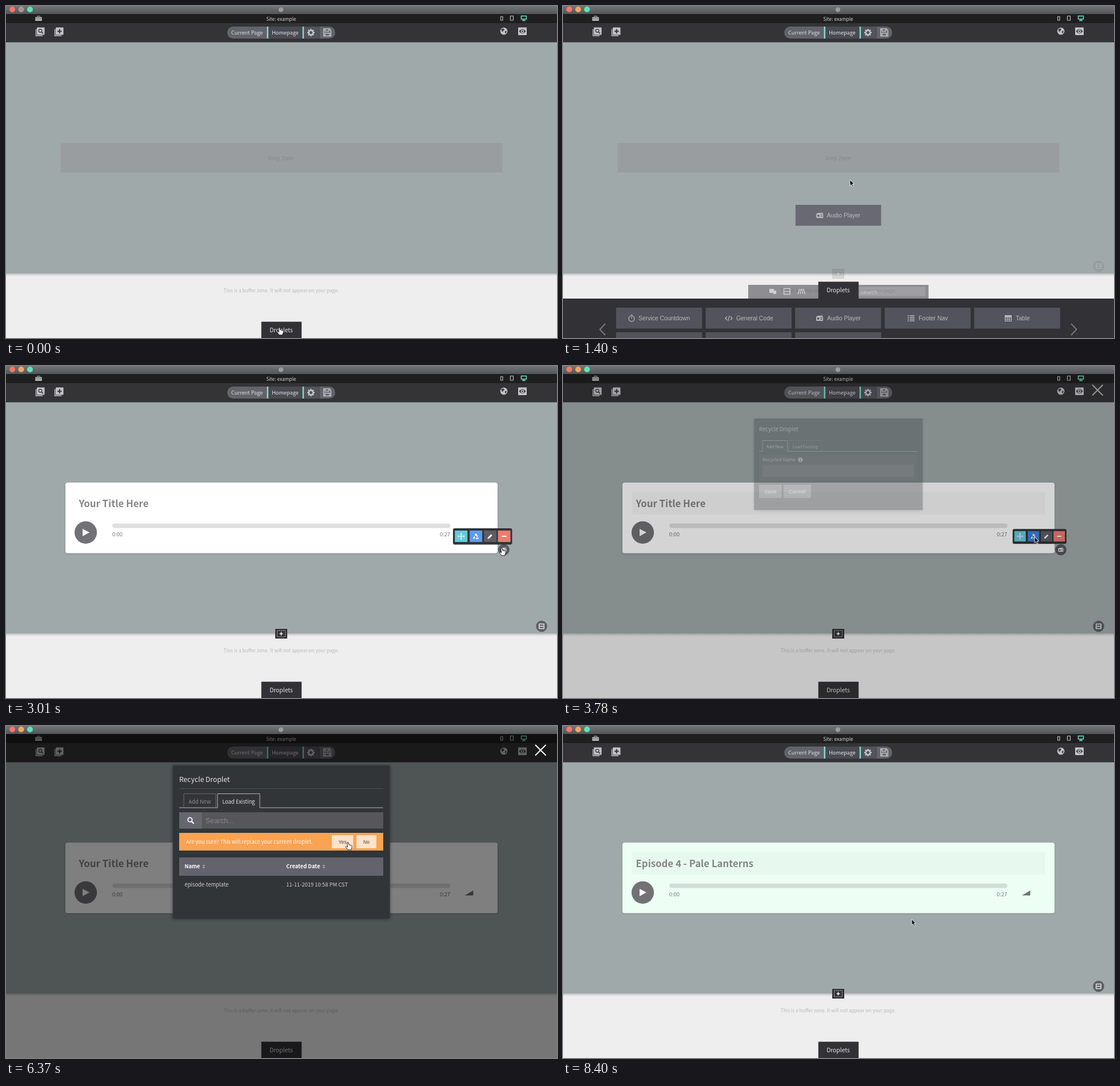
An HTML page for the animation above (8470 ms loop, 964 by 581 pixels).

```html
<!DOCTYPE html>
<html lang="en">
<head>
<meta charset="utf-8">
<title>Page builder</title>
<style>
html, body { margin: 0; width: 100%; height: 100%; overflow: hidden; background: #eee; }
svg { display: block; width: 964px; height: 581px; }
text { font-family: "Noto Sans CJK JP", "Noto Sans CJK SC", "Noto Sans CJK", "Noto Sans", sans-serif; white-space: pre; }
text.ui { font-family: "Liberation Sans", Arial, sans-serif; }
</style>
</head>
<body>
<svg id="stage" viewBox="0 0 964 581" xmlns="http://www.w3.org/2000/svg"></svg>
<script>
const LOOP = 8470;
const ICON = '#c2c3c6';

// Markup helpers
const rect = (x, y, w, h, fill, more = '') =>
  `<rect x="${x}" y="${y}" width="${w}" height="${h}" fill="${fill}" ${more}/>`;
const circle = (x, y, r, fill, more = '') => `<circle cx="${x}" cy="${y}" r="${r}" fill="${fill}" ${more}/>`;
const fillPath = (d, fill, more = '') => `<path d="${d}" fill="${fill}" ${more}/>`;
const line = (d, stroke, width = 1, more = '') =>
  `<path d="${d}" fill="none" stroke="${stroke}" stroke-width="${width}" ${more}/>`;
const text = (x, y, s, size, fill, more = '') =>
  `<text x="${x}" y="${y}" font-size="${size}" fill="${fill}" ${more}>${s}</text>`;
const group = (id, body, more = '') => `<g id="${id}" ${more}>${body}</g>`;
const place = (x, y, body) => `<g transform="translate(${x} ${y})">${body}</g>`;
const MID = 'text-anchor="middle"';
const UI = 'class="ui"';
const BOLD = 'font-weight="700"';

// Icons, centred on their origin
const radio = (c, hole) => rect(-6, -3.5, 12, 8, c, 'rx="1"') + circle(-2.5, .5, 2, hole) +
  rect(1, -1.5, 4, 1.2, hole) + rect(1, 1.2, 4, 1.2, hole) + line('M-4 -3.5 L5 -5', c, 1);
const clock = c => circle(0, .6, 5, 'none', `stroke="${c}" stroke-width="1.2"`) +
  line('M0 .6 V-2.4 M-1.5 -6 H1.5', c, 1.2);
const code = c => line('M-3 -3 L-6 0 L-3 3 M3 -3 L6 0 L3 3 M1.3 -4.5 L-1.3 4.5', c, 1.2);
const list = c => line('M-6 -4.5 H-4 M-6 -1.5 H-4 M-6 1.5 H-4 M-6 4.5 H-4 M-2.5 -4.5 H6 M-2.5 -1.5 H6 M-2.5 1.5 H6 M-2.5 4.5 H6', c, 1.5);
const table = c => line('M-5.5 -5 H5.5 V5 H-5.5 Z M-5.5 -1.5 H5.5 M-5.5 1.8 H5.5 M-1.8 -4 V5 M1.8 -4 V5', c, 1.1) +
  rect(-6, -5.5, 12, 3, c);
const lens = (c, k = 1) => `<g transform="scale(${k})">` +
  circle(-1, -1, 3.4, 'none', `stroke="${c}" stroke-width="1.6"`) + line('M1.5 1.5 L5 5', c, 2) + '</g>';
const gear = c => Array.from({ length: 8 }, (_, i) =>
  rect(-1.3, -6.5, 2.6, 4, c, `transform="rotate(${i * 45})"`)).join('') +
  circle(0, 0, 3.8, 'none', `stroke="${c}" stroke-width="2"`);
const sorter = c => fillPath('M-2.6 -.7 L0 -3.5 L2.6 -.7 Z M-2.6 .7 L0 3.5 L2.6 .7 Z', c);

function windowBar() {
  return rect(0, 0, 964, 14, 'url(#bar)') + circle(11, 6, 5, '#fb7565') +
    circle(26.5, 6, 5, '#f5a55f', 'id="amber"') + circle(42, 6, 5, '#62e2b8') + circle(481, 6.5, 4, '#9b9da0');
}

function header() {
  const page = line('M-7.5 -4 V7.5 H4', ICON, 1.4) + rect(-6, -7, 13.5, 13, ICON, 'rx="1"');
  const site = rect(0, 14, 964, 16, '#1f1f20') + rect(0, 30, 964, 33.5, '#343437') +
    rect(51, 19.5, 12, 6.5, '#b5b6b8', 'rx="1"') + line('M54.5 19 V17.8 H59.5 V19', '#b5b6b8') +
    rect(51, 22, 12, .8, '#555') + text(481.5, 26, 'Site: example', 8.4, '#d4d4d5', MID) +
    line('M865.5 18.5 H869 V25 H865.5 Z', '#bbb', 1.2) + line('M882.5 17.5 H887.5 V25 H882.5 Z', '#bbb', 1.2) +
    line('M901.5 17.5 H910.5 V23 H901.5 Z M903 25.5 H909 M906 23 V25', '#6be0c5', 1.5);
  const tools = place(60, 44.5, page + place(.8, -.4, lens('#343437', .8))) +
    place(93, 44.5, page + line('M.8 -4 V3.5 M-3 -.3 H4.5', '#343437', 2)) +
    rect(387, 36, 189, 21, '#63636b', 'rx="10.5"') + rect(459, 36, 60, 21, '#4a4a52') +
    rect(521, 36, 26.5, 21, '#53535b') + rect(547.5, 36, 1, 21, '#414147') +
    rect(456.5, 36, 2.5, 21, '#7ddccb') + rect(518.7, 36, 2.5, 21, '#7ddccb') +
    text(421.7, 50, 'Current Page', 9.2, '#dcdcde', MID) + text(488.5, 50, 'Homepage', 9.2, '#e2e2e4', MID) +
    place(533.5, 46.5, gear(ICON)) +
    line('M555.7 40 H566 L568.3 42.5 V52.5 H555.7 Z M558 40 V44 H565 V40 M558 52 V47.5 H566 V52', ICON, 1.5);
  const right = circle(871, 44, 6.3, ICON) +
    fillPath('M866 41 L870 39 L872 41 L870 44 L868 45 L869 48 Z M873 44 L876 43 L875 47 L873 48 Z', '#45464a') +
    rect(896, 37.5, 15, 13.5, ICON, 'rx="1"') + fillPath('M897.5 44.2 Q903.5 37 909.5 44.2 Q903.5 51.5 897.5 44.2 Z', '#343437') +
    circle(903.5, 44.2, 2.8, ICON) + circle(903.5, 44.2, 1.2, '#343437');
  return site + tools + right;
}

function player() {
  return rect(104, 204, 756, 123.5, '#fff', 'rx="4" id="card" filter="url(#soft)"') +
    rect(121, 220.5, 722, 39.5, '#000', 'id="titleBox"') +
    text(127.5, 246.5, '', 16.8, '#858687', `${BOLD} id="title"`) +
    circle(139.5, 291.3, 19.6, '#727276') + fillPath('M134 285 L146 291.3 L134 297.8 Z', '#fff') +
    rect(186, 275.8, 591.5, 7.6, '#000', 'rx="3.8" opacity=".125"') +
    text(185.7, 297.6, '0:00', 9.4, '#77787a', 'font-weight="500"') +
    text(777.2, 297.6, '0:27', 9.4, '#77787a', 'font-weight="500" text-anchor="end"') +
    fillPath('M803 296.6 L817.5 287.8 V296.6 Z', '#707174');
}

function menu() {
  const slot = (x, fill, icon, id = '') => place(x, 298, rect(-11, -10, 22, 20, fill, id) + icon);
  return rect(782, 284, 103.5, 28.5, '#333337', 'rx="3"') +
    slot(796.3, '#62cbdc', line('M-5 0 H5 M0 -5 V5 M-5 -1.5 V1.5 M5 -1.5 V1.5 M-1.5 -5 H1.5 M-1.5 5 H1.5', '#fff', 1.2)) +
    slot(822.2, '#5a9cf0', line('M0 -4 L4 3.5 H-4 Z', '#fff', 1.9, 'stroke-dasharray="5.5 1.8" stroke-linejoin="round"'), 'id="recycle"') +
    slot(847.2, '#5d5e63', line('M-3 3 L2.6 -2.6', '#fff', 3) + fillPath('M-4.8 4.8 L-4 1.6 L-1.6 4 Z', '#fff')) +
    slot(871.6, '#ee7a72', line('M-4 0 H4', '#fff', 2));
}

function tray() {
  const labels = [['Service Countdown', 120, 132, clock], ['General Code', 290, 303, code],
    ['Audio Player', 449, 462, c => radio(c, '#53535d')], ['Footer Nav', 609, 622, list], ['Table', 779, 792, table]];
  const column = i => 93 + i * 156.6;
  const button = (i, y) => rect(column(i), y, 150.3, 36.5, '#53535d');
  const items = labels.map(([s, ix, tx, icon], i) => button(i, 16) + place(ix, 34.5, icon('#b9b9be')) +
    text(tx, 38, s, 10.4, '#b9b9be', UI)).join('') + [0, 1, 2].map(i => button(i, 59)).join('');
  const strip = rect(324, -24, 315.5, 24, '#5b5b62') + rect(515, -20.5, 119, 16, '#77777d') +
    fillPath('M361 -17 H369 V-14 H373 V-8 H368 V-10 H361 Z', '#c0c0c4') +
    line('M386.5 -17.5 H397 V-7.5 H386.5 Z M386.5 -12.5 H397', '#c0c0c4', 1.5) +
    line('M411 -8 L414 -17 M415 -8 L416.5 -17 M418 -17 L419.5 -8 M420.5 -17 L423.5 -8', '#c0c0c4', 1.5) +
    text(520, -8.5, 'Search', 9.5, '#b9b9be', UI);
  return group('strip', strip) + rect(446.7, -29.5, 70.5, 31, '#323236') +
    text(481.5, -11, 'Droplets', 10.3, '#e6e6e8', MID) + rect(0, 0, 964, 125, '#323236') + items +
    line('M74 44 L64.5 54 L74 64 M889 44 L898.5 54 L889 64', '#78787d', 2);
}

function modal() {
  const rim = active => active ? '#b4b5b8' : '#66676b';
  const tab = (x, w, s, active) => line(`M${x} 143 V118.5 H${x + w} V143`, rim(active)) +
    text(x + w / 2, 135.5, s, 9.35, active ? '#e2e2e4' : (s === 'Add New' ? '#8b8c90' : '#c5c5c8'), MID);
  const rule = (from, to) => line(`M303 143 H${from} M${to} 143 H660`, '#b4b5b8');
  const tabs = first => tab(311, 56, 'Add New', first) + tab(370, 74, 'Load Existing', !first) +
    (first ? rule(311, 367) : rule(370, 444));
  const push = (x, w, s) => rect(x, 218, w, 30, '#74757d') + text(x + w / 2, 237.5, s, 12.2, '#fff', `${UI} ${MID}`);
  const addNew = tabs(true) + rect(303, 151, 357, 57, '#3e3f43') + text(311, 166, 'Recycled Name', 10.3, '#cbcccf') +
    circle(396, 162, 5, '#d6d6d8') + rect(395.2, 161.3, 1.8, 4, '#3e3f43') + rect(395.2, 158.6, 1.8, 1.7, '#3e3f43') +
    rect(311, 173, 341, 27.5, '#56575a') + push(303, 51, 'Save') + push(358, 62, 'Cancel');
  const answer = (x, w, s) => rect(x, 191, w, 23, '#fde2ca') + text(x + w / 2, 206, s, 8.6, '#444', `${UI} ${MID}`);
  const confirm = rect(303, 187, 357, 31, '#f9a353') +
    text(315, 206, 'Are you sure? This will replace your current droplet.', 9.32, '#fff5e8') +
    answer(570, 37.5, 'Yes') + answer(613, 35, 'No');
  const rows = rect(303, 230, 357, 32, '#62636d') +
    text(312.5, 249.3, 'Name', 9.35, '#fff', BOLD) + place(346, 246, sorter('#a9aab0')) +
    text(490.3, 249.3, 'Created Date', 9.35, '#fff', BOLD) + place(556, 246, sorter('#a9aab0')) +
    text(312.5, 281.3, 'episode-template', 9.35, '#cfd0d2') + text(490.3, 281.3, '11-11-2019 10:58 PM CST', 9.35, '#cfd0d2');
  const load = tabs(false) + rect(303, 151, 357, 28.5, '#56575b') + rect(303, 151, 39.5, 28.5, '#66676e') +
    place(323, 165.2, lens('#fff', 1.1)) + text(349, 170, 'Search...', 12.4, '#88898d', UI) +
    group('confirm', confirm) + group('rows', rows);
  return rect(291.7, 69, 380, 206, '#333438', 'id="panel" filter="url(#deep)"') +
    text(303, 97.7, 'Recycle Droplet', 12.2, '#e4e4e6') + line('M303 109.5 H660', '#4c4d52') +
    group('addNew', addNew) + group('load', load);
}

const plusButton = rect(471, 460, 21, 17, '#333336') +
  line('M474.5 463 H488.5 V474 H474.5 Z', '#c5c5c8', 1, 'stroke-dasharray="2 1.3"') + line('M478.5 468.5 H484.5 M481.5 465.5 V471.5', '#fff', 1.5);
const sectionButton = circle(937, 455.5, 9.8, '#5e5f64') + line('M932.7 451.5 H941.3 V459.5 H932.7 Z M932.7 455.5 H941.3', '#e3e3e5', 1.4);
const dropZone = rect(95.5, 240, 773, 51.5, '#999d9f') + text(481, 269.7, 'Drop Zone', 9.4, '#84898b', MID);
const helper = rect(0, 0, 149.7, 36.5, '#64656e') + place(42.5, 18.5, radio('#c0c0c5', '#64656e')) +
  text(55, 22.3, 'Audio Player', 10.3, '#c0c0c5', UI);
const arrow = fillPath('M0 0 V10.5 L2.4 8.3 L4.1 12.3 L5.9 11.5 L4.2 7.6 H7.3 Z', '#111', 'stroke="#fff" stroke-width=".8"');
const hand = fillPath('M-1.2 0 Q.2 -1 1.2 .4 L2 4 Q3.4 3.2 4 4.4 Q5.3 3.8 5.8 5 Q7.2 4.8 7.3 6.4 Q7.4 9.5 5.9 11.2 V12.8 H-.2 Q-.8 10.8 -3.4 8.4 Q-4.2 6.5 -2.4 6.6 L-.4 8 Z',
  '#fff', 'stroke="#111" stroke-width=".9"');

const stage = document.getElementById('stage');
stage.innerHTML = `<defs>
  <linearGradient id="bar" x2="0" y2="1"><stop stop-color="#727577"/><stop offset="1" stop-color="#535658"/></linearGradient>
  <linearGradient id="edge" x2="0" y2="1"><stop stop-opacity=".2"/><stop offset="1" stop-opacity="0"/></linearGradient>
  <filter id="soft"><feDropShadow dx="0" dy="1" stdDeviation="1.5" flood-opacity=".2"/></filter>
  <filter id="deep"><feDropShadow dx="0" dy="1" stdDeviation="3" flood-opacity=".4"/></filter></defs>` +
  rect(0, 0, 964, 581, '#eee') + rect(0, 63, 964, 405, '#a0a9aa') + rect(0, 468, 964, 5, 'url(#edge)') +
  text(481.5, 500.6, 'This is a buffer zone. It will not appear on your page.', 8.39, '#b9b9b9', MID) +
  header() + group('dropZone', dropZone) + group('player', player()) +
  group('controls', plusButton + sectionButton) +
  group('handle', circle(871, 321.5, 9.8, '#57585c') + place(871, 321.5, `<g transform="scale(.75)">${radio('#e3e3e5', '#57585c')}</g>`)) +
  group('menu', menu()) + group('tray', tray()) + group('helper', helper) +
  rect(0, 14, 964, 567, '#000', 'id="shade"') + windowBar() + group('modal', modal()) +
  line('M926 33 L944.5 51.5 M944.5 33 L926 51.5', '#fff', 2, 'id="close"') +
  group('arrow', arrow) + group('hand', hand);

const el = {};
stage.querySelectorAll('[id]').forEach(node => el[node.id] = node);

// Eased value at time t along [time, value] pairs
function track(t, ...keys) {
  if (t <= keys[0][0]) return keys[0][1];
  for (let i = 1; i < keys.length; i++) {
    const [t0, a] = keys[i - 1], [t1, b] = keys[i];
    if (t <= t1) {
      const p = (t - t0) / (t1 - t0);
      return a + (b - a) * p * p * (3 - 2 * p);
    }
  }
  return keys[keys.length - 1][1];
}
const within = (t, ...spans) => spans.some(([a, b]) => t >= a && t < b);
const fade = (node, v) => {
  node.setAttribute('opacity', v);
  node.setAttribute('display', v > 0 ? 'inline' : 'none');
};
const move = (node, x, y) => node.setAttribute('transform', `translate(${x} ${y})`);
const zoom = (node, x, y, k) =>
  node.setAttribute('transform', `translate(${x} ${y}) scale(${k}) translate(${-x} ${-y})`);

const pointer = [[0, 478, 563], [350, 478, 563], [750, 490, 496], [850, 490, 496], [1250, 502, 304], [1480, 502, 304],
  [2500, 868, 318], [3010, 867, 319], [3150, 867, 319], [3500, 825, 299], [3800, 825, 299], [4560, 426, 137],
  [4900, 426, 137], [5400, 345, 234], [5650, 345, 234], [6250, 598, 204], [6500, 598, 204], [7300, 610, 338]];

function render(t) {
  el.amber.setAttribute('fill', t < 70 ? '#a09a97' : '#f5a55f');

  move(el.tray, 0, track(t, [140, 582], [420, 460], [1310, 460], [1400, 512], [1540, 582]));
  fade(el.strip, track(t, [150, 0], [400, 1], [1310, 1], [1400, .65], [1520, 0]));
  fade(el.helper, within(t, [850, 1600]) ? track(t, [1300, .93], [1400, .93], [1600, 0]) : 0);
  move(el.helper, 406.8, track(t, [850, 476], [1250, 292], [1310, 292], [1400, 348], [1600, 440]));

  fade(el.dropZone, track(t, [1560, 1], [1700, 0]));
  fade(el.player, track(t, [1600, 0], [1820, 1]));
  const replaced = t >= 7420;
  el.title.textContent = replaced ? 'Episode 4 - Pale Lanterns' : 'Your Title Here';
  const tint = track(t, [7420, 0], [7700, 1]);
  el.card.setAttribute('fill', `rgb(${255 - 18 * tint},255,${255 - 11 * tint})`);
  fade(el.titleBox, track(t, [3250, 0], [3400, .03], [3850, .03], [4000, 0], [7420, 0], [7600, .022]));

  fade(el.controls, track(t, [1330, 0], [1400, .15], [1750, 1], [3790, 1], [4000, 0], [7350, 0], [7560, 1]));
  fade(el.handle, track(t, [2100, 0], [2300, 1], [3790, 1], [4000, 0]));
  fade(el.menu, track(t, [2860, 0], [2960, 1], [3790, 1], [3960, 0]));
  zoom(el.menu, 833.7, 298, track(t, [2860, .3], [3010, 1], [3160, .91]));
  el.recycle.setAttribute('fill', within(t, [3430, 4000]) ? '#3c82d8' : '#5a9cf0');

  fade(el.shade, track(t, [3660, 0], [3780, .17], [4000, .5], [6560, .5], [6800, 0]));
  fade(el.modal, track(t, [3660, 0], [3780, .3], [4000, 1], [6560, 1], [6760, 0]));
  fade(el.close, track(t, [3660, 0], [3780, .5], [4000, 1], [6560, 1], [6760, 0]));
  const loading = t >= 4900;
  const confirm = track(t, [5600, 0], [5740, 1]);
  const height = loading ? 225 + 43 * confirm : 206;
  el.panel.setAttribute('height', height);
  fade(el.addNew, loading ? 0 : 1);
  fade(el.load, loading ? 1 : 0);
  fade(el.confirm, confirm);
  move(el.rows, 0, 43 * (confirm - 1));
  zoom(el.modal, 481.7, 69 + height / 2, track(t, [3660, .68], [3780, .776], [4000, 1], [6560, 1], [6760, .7]));

  const x = track(t, ...pointer.map(k => [k[0], k[1]]));
  const y = track(t, ...pointer.map(k => [k[0], k[2]]));
  const pointing = within(t, [0, 450], [700, 860], [2480, 3280], [4460, 5000], [5250, 5780], [6180, 6620]);
  fade(el.hand, pointing ? 1 : 0);
  fade(el.arrow, pointing ? 0 : 1);
  move(el.hand, x, y);
  move(el.arrow, x, y);
}

const start = performance.now();
function tick() {
  const t = (performance.now() - start) % LOOP;
  render(Math.floor(t / 70) * 70);
  requestAnimationFrame(tick);
}
tick();
</script>
</body>
</html>
```
